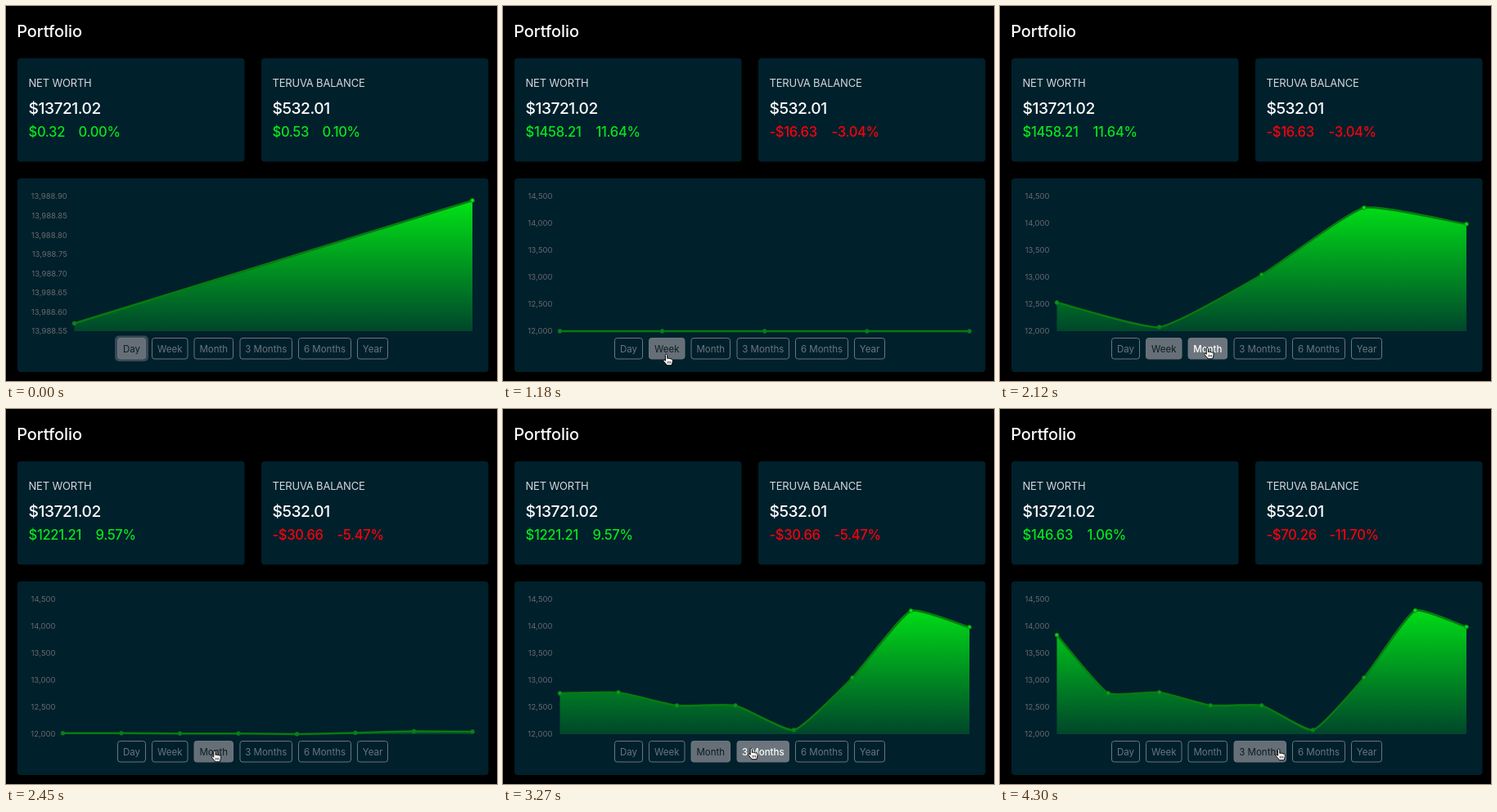
Write an HTML page with a canvas that moves like this. It is 600 px wide and 459 px high and loops after 4.33 s.

```html
<!DOCTYPE html>
<html lang="en">
<head>
<meta charset="utf-8">
<title>Portfolio</title>
<style>
html, body { margin: 0; width: 100%; height: 100%; background: #000; overflow: hidden; }
canvas { display: block; }
</style>
</head>
<body>
<canvas id="stage" width="600" height="459"></canvas>
<script>
const ctx = document.getElementById('stage').getContext('2d');
const LOOP = 4330, BASE = 398, RIGHT = 570, TENSION = 0.15;
const CARD = '#00202c', GREEN = '#08e41c', RED = '#f0040c', GRAY = '#6c757d', LINE = '#087a0e';

const buttons = [
  ['Day', 136, 35], ['Week', 178, 44.5], ['Month', 229.5, 48.5],
  ['3 Months', 285.5, 64.5], ['6 Months', 357, 65], ['Year', 429, 38]
];

// Heights above the baseline; shorter ranges show the tail.
const history = [121, 50, 51, 35, 35, 5, 69, 151, 131];
const wide = {
  left: 69.5, labelX: 60.5,
  labels: [...Array(6)].map((_, i) => (14500 - i * 500).toLocaleString('en-US'))
};
const narrow = {
  left: 83.5, labelX: 74.8,
  labels: [...Array(8)].map((_, i) => '13,988.' + (90 - i * 5))
};
const ranges = [
  { start: -2000, axis: narrow, data: [9.5, 160], worth: ['$0.32', '0.00%', 89], coin: ['$0.53', '0.10%', 387] },
  { start: 1070, axis: wide, data: history.slice(-5), worth: ['$1458.21', '11.64%', 114], coin: ['-$16.63', '-3.04%', 402] },
  { start: 2171, axis: wide, data: history.slice(-8), worth: ['$1221.21', '9.57%', 110], coin: ['-$30.66', '-5.47%', 405] },
  { start: 3441, axis: wide, data: history, worth: ['$146.63', '1.06%', 107], coin: ['-$70.26', '-11.70%', 403] }
];

// Pointer path: time, x, y
const path = [
  [340, 189, 462], [690, 194.5, 426], [1250, 195.5, 426], [1490, 218.5, 422], [2000, 249, 418],
  [2700, 251.5, 418], [3200, 299, 415], [3880, 304.5, 415], [4300, 336.5, 416]
];
const hand = new Path2D('M3 1.6 C3 -.2 5.3 -.2 5.3 1.6 V5.6 C6 4.8 7.4 5 7.5 5.9 C8.2 5.1 9.5 5.4 9.6 6.3 ' +
  'C10.4 5.7 11.8 6.1 11.8 7.3 V9.6 C11.8 11.4 10.7 12 10.6 13.8 H4.8 C4.5 12.3 1.9 10.4 .7 8.5 ' +
  'C0 7.3 1.4 6.5 2.3 7.5 L3 8.3 Z');

function vertical(top, bottom) {
  const g = ctx.createLinearGradient(0, 228, 0, BASE);
  g.addColorStop(0, top);
  g.addColorStop(1, bottom);
  return g;
}
const areaFill = vertical('#00ee14', '#00462b');
const dotFill = vertical('#00ee14', '#0a7c20');

function elasticInOut(t) {
  if (t <= 0) return 0;
  if (t >= 1) return 1;
  const u = 2 * t - 1, wave = Math.sin((u - 0.1125) * 2 * Math.PI / 0.45) / 2;
  return u < 0 ? -(2 ** (10 * u)) * wave : 2 ** (-10 * u) * wave + 1;
}

function text(str, x, y, size, color, { weight = 400, spacing = 0, align = 'left' } = {}) {
  ctx.font = `${weight} ${size}px Inter, Roboto, sans-serif`;
  ctx.letterSpacing = spacing * size + 'px';
  ctx.textAlign = align;
  ctx.fillStyle = color;
  ctx.fillText(str, x, y);
}

function box(x, y, w, h, r) {
  ctx.beginPath();
  ctx.roundRect(x, y, w, h, r);
}

function card(x, y, w, h) {
  box(x, y, w, h, 4);
  ctx.fillStyle = CARD;
  ctx.fill();
}

function summary(x, title, total, [change, percent, percentX]) {
  const color = change[0] === '-' ? RED : GREEN;
  const style = { weight: 500, spacing: -0.02 };
  card(x, 64, 277.5, 126.5);
  text(title, x + 13.5, 99, 13, '#d3d8db', { spacing: -0.015 });
  text(total, x + 13.5, 132, 19.2, '#fff', { weight: 500, spacing: -0.025 });
  text(change, x + 13.5, 160, 16.6, color, style);
  text(percent, percentX - 0.5, 160, 16.6, color, style);
}

// Cubic spline whose handles follow the chord between each point's neighbours.
function curve(pts) {
  const dist = (a, b) => Math.hypot(b[0] - a[0], b[1] - a[1]);
  const handles = pts.map((p, i) => {
    const prev = pts[i - 1] || p, next = pts[i + 1] || p;
    const before = dist(prev, p), after = dist(p, next);
    const handle = length => {
      const k = TENSION * length / (before + after);
      return [k * (next[0] - prev[0]), k * (next[1] - prev[1])];
    };
    return { into: handle(before), out: handle(after) };
  });
  ctx.beginPath();
  ctx.moveTo(...pts[0]);
  for (let i = 1; i < pts.length; i++) {
    const [x0, y0] = pts[i - 1], [x1, y1] = pts[i];
    const { out } = handles[i - 1], { into } = handles[i];
    ctx.bezierCurveTo(x0 + out[0], y0 + out[1], x1 - into[0], y1 - into[1], x1, y1);
  }
}

function clipped(bottom, paint) {
  ctx.save();
  ctx.beginPath();
  ctx.rect(60, 211, 516, bottom - 211);
  ctx.clip();
  paint();
  ctx.restore();
}

function chart({ start, axis, data }, t) {
  const { left, labelX, labels } = axis;
  labels.forEach((s, i) =>
    text(s, labelX, 236.4 + i * 165 / (labels.length - 1), 9.5, '#666a6c', { align: 'right' }));

  const grow = elasticInOut((t - start) / 1000);
  const pts = data.map((v, i) => [left + (RIGHT - left) * i / (data.length - 1), BASE - v * grow]);

  clipped(BASE, () => {
    curve(pts);
    ctx.lineTo(RIGHT, BASE);
    ctx.lineTo(left, BASE);
    ctx.fillStyle = areaFill;
    ctx.fill();
  });

  clipped(402.5, () => {
    curve(pts);
    ctx.strokeStyle = LINE;
    ctx.lineWidth = 2.5;
    ctx.stroke();

    ctx.lineWidth = 0.8;
    ctx.fillStyle = dotFill;
    for (const [x, y] of pts) {
      ctx.beginPath();
      ctx.arc(x, y, 2.4, 0, 7);
      ctx.fill();
      ctx.stroke();
    }
  });
}

function pointer(t) {
  if (t < path[0][0]) return null;
  const i = path.findIndex(k => k[0] >= t);
  if (i < 0) return path.at(-1).slice(1);
  if (i === 0) return path[0].slice(1);
  const [t0, x0, y0] = path[i - 1], [t1, x1, y1] = path[i];
  const p = (t - t0) / (t1 - t0), e = p * p * (3 - 2 * p);
  return [x0 + (x1 - x0) * e, y0 + (y1 - y0) * e];
}

function drawButtons(active, pos) {
  buttons.forEach(([label, x, w], i) => {
    const over = pos && pos[0] + 4 >= x && pos[0] + 4 <= x + w && pos[1] >= 406 && pos[1] <= 432;
    const on = i === active;
    if (on && i === 0) {
      box(x - 3, 403.5, w + 6, 31.5, 5);
      ctx.fillStyle = 'rgba(108,117,125,.5)';
      ctx.fill();
    }
    box(x + 0.5, 406.5, w - 1, 25.5, 3);
    if (on || over) {
      ctx.fillStyle = on ? '#666f77' : GRAY;
      ctx.fill();
    }
    ctx.strokeStyle = GRAY;
    ctx.lineWidth = 1;
    ctx.stroke();
    text(label, x + w / 2, 423.6, 11.5, on ? '#0c1c24' : over ? '#fff' : GRAY,
      { align: 'center', weight: over && !on ? 500 : 400 });
  });
}

function drawPointer([x, y]) {
  ctx.save();
  ctx.translate(x, y);
  ctx.lineJoin = 'round';
  ctx.fillStyle = '#fff';
  ctx.strokeStyle = '#000';
  ctx.lineWidth = 1;
  ctx.fill(hand);
  ctx.stroke(hand);
  ctx.beginPath();
  for (const fx of [5.7, 7.5, 9.3]) {
    ctx.moveTo(fx, 8.8);
    ctx.lineTo(fx, 11.6);
  }
  ctx.lineWidth = 0.7;
  ctx.stroke();
  ctx.restore();
}

function draw(t) {
  const active = ranges.findLastIndex(r => t >= r.start);
  const range = ranges[active], pos = pointer(t);
  ctx.fillStyle = '#000';
  ctx.fillRect(0, 0, 600, 459);
  text('Portfolio', 13.2, 38.2, 20, '#fff', { weight: 500, spacing: -0.004 });
  summary(14, 'NET WORTH', '$13721.02', range.worth);
  summary(312, 'TERUVA BALANCE', '$532.01', range.coin);
  card(14, 211, 575.5, 237);
  chart(range, t);
  drawButtons(active, pos);
  if (pos) drawPointer(pos);
}

const begin = performance.now();
function tick() {
  draw((performance.now() - begin) % LOOP);
  requestAnimationFrame(tick);
}
tick();
</script>
</body>
</html>
```
